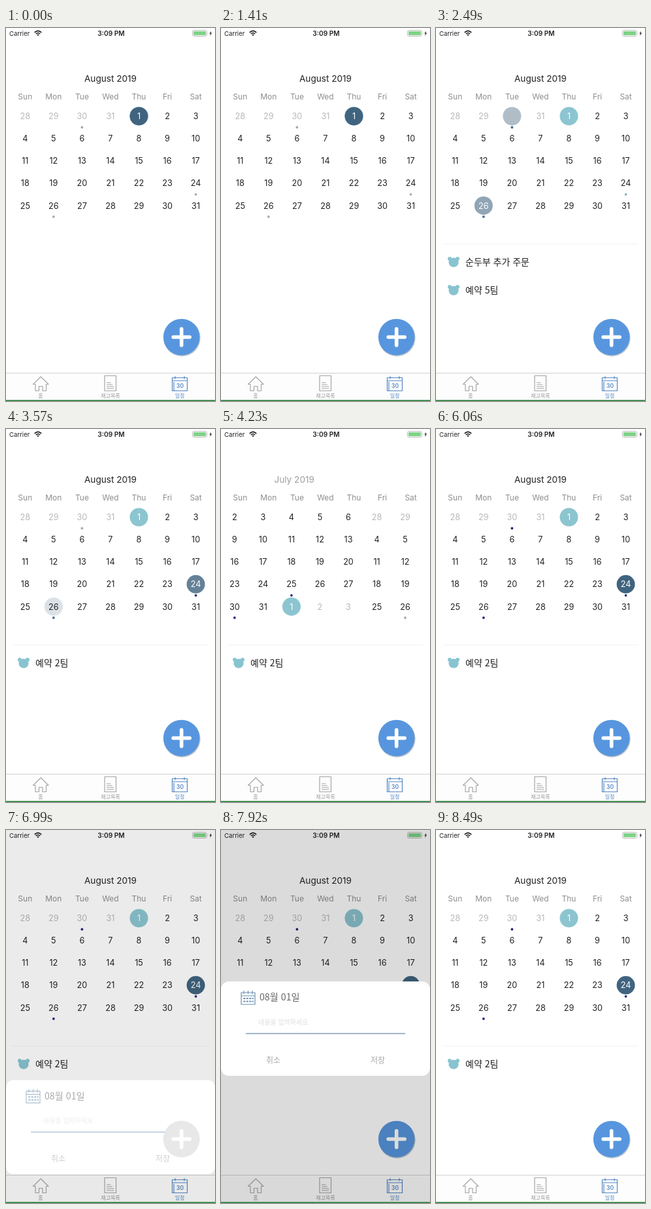
An HTML page that plays this animation: 320x569 px, repeating every 8550 ms.

```html
<!DOCTYPE html>
<html lang="ko">
<head>
<meta charset="utf-8">
<title>Calendar</title>
<style>
html, body { margin: 0; height: 100%; overflow: hidden; background: #fff; }
svg { display: block; width: 100vw; height: 100vh; }
text { font-family: Inter, "Noto Sans CJK KR", "Noto Sans CJK", sans-serif; }
.ko { font-family: "Noto Sans CJK KR", "Noto Sans CJK", sans-serif; }
.mid { text-anchor: middle; }
.line { fill: none; stroke-width: 1.2; stroke-linejoin: round; stroke-linecap: round; }
</style>
</head>
<body>
<svg viewBox="0 0 320 569">
  <defs>
    <clipPath id="page"><rect x="7" y="60" width="306" height="260"/></clipPath>
    <clipPath id="card"><rect width="320" height="144" rx="12"/></clipPath>
    <g id="bear" fill="#88c4d0">
      <ellipse cx="27" cy="0.6" rx="7.6" ry="7.2"/>
      <circle cx="21" cy="-5" r="3"/><circle cx="33" cy="-5" r="3"/>
    </g>
    <path id="cross" d="M-12.5 0H12.5M0-12.5V12.5" stroke="#fff" stroke-width="5.6" stroke-linecap="round"/>
  </defs>
  <rect width="320" height="569" fill="#fff"/>

  <g fill="#222">
    <text x="5" y="11.8" font-size="9.6">Carrier</text>
    <text x="161" y="12" font-size="10.2" font-weight="600" class="mid">3:09 PM</text>
    <g class="line" stroke="#111" style="stroke-width:1.6;stroke-linecap:butt">
      <path d="M43.8 6.8Q49 2 54.2 6.8M45.8 9Q49 6 52.2 9"/>
    </g>
    <path d="M47.3 10.2Q49 8.8 50.7 10.2L49 12.2Z"/>
    <rect x="285.5" y="3.5" width="22" height="9" rx="2.5" fill="#fff" stroke="#bbb"/>
    <rect x="287" y="5" width="19" height="6" rx="1.2" fill="#7fd288"/>
    <path d="M309 6.5q1.4 1.5 0 3Z" fill="#bbb"/>
    <path d="M314 4.5L311.4 8.6H313L312.2 12L315.2 7.6H313.4Z"/>
  </g>

  <g id="titles" font-size="13.6" fill="#222" class="mid">
    <text y="82">August 2019</text><text y="82">July 2019</text>
  </g>
  <g id="week" font-size="12" fill="#8e8e8e" class="mid"></g>
  <g clip-path="url(#page)" font-size="12.7" class="mid"><g id="august"></g><g id="july"></g></g>

  <path id="rule" d="M10 329.5H310" stroke="#f3f3f3"/>
  <g id="two" class="ko" font-size="14" fill="#222">
    <use href="#bear" y="357"/><text class="ko" x="45" y="362">순두부 추가 주문</text>
    <use href="#bear" y="400"/><text class="ko" x="45" y="405">예약 5팀</text>
  </g>
  <g id="one" font-size="14" fill="#222">
    <use href="#bear" y="357"/><text class="ko" x="45" y="362">예약 2팀</text>
  </g>

  <g transform="translate(268.7 471.5)">
    <circle cx=".8" cy="1.2" r="28.2" fill="#8a96a4" opacity=".55"/>
    <circle r="27.8" fill="#5796de"/><use href="#cross"/>
  </g>

  <rect y="526" width="320" height="43" fill="#fdfdfd"/>
  <path d="M0 526.5H320" stroke="#d2d2d2"/>
  <g class="line" stroke="#a6a6a6">
    <path d="M41.5 543.5L53.3 532L65 543.5H61.5V553.5H56V546.5H50.5V553.5H45V543.5Z"/>
    <path d="M151 530.5H168.5V553.5H151ZM154.5 541H160M154.5 544H162.5M154.5 547H165M154.5 550H165"/>
  </g>
  <g class="line" stroke="#5588c4">
    <path d="M254.5 533.5H277.5V553.5H254.5ZM254.5 538H277.5M259 531.5V535M273 531.5V535M257 553.5V540"/>
  </g>
  <text x="266.5" y="549" font-size="8.5" font-weight="600" fill="#5588c4" class="mid">30</text>
  <g font-size="8" fill="#999" class="mid">
    <text class="ko" x="53" y="564.3">홈</text><text class="ko" x="160" y="564.3">재고목록</text>
    <text class="ko" x="266" y="564.3" fill="#5588c4">일정</text>
  </g>

  <rect id="dim" width="320" height="569"/>
  <g id="sheet"><g clip-path="url(#card)">
    <rect width="320" height="144" fill="#fff"/>
    <g id="form">
      <g class="line" stroke="#6d8fb0">
        <path d="M31 17H52V35H31ZM31 22H52M35 14.5V19M41.5 14.5V19M48 14.5V19"/>
        <path d="M35 26H49M35 30.5H49" stroke-dasharray="1.5 3" stroke-width="2"/>
      </g>
      <text class="ko" x="59" y="29.3" font-size="14.2" fill="#666">08월 01일</text>
      <text class="ko" x="57" y="66" font-size="10" fill="#ddd">내용을 입력하세요</text>
      <path d="M38 79.5H282" stroke="#7f9dbb" stroke-width="1.4"/>
      <g font-size="12" fill="#a8a8a8" class="mid">
        <text class="ko" x="80" y="124.5">취소</text><text class="ko" x="240" y="124.5">저장</text>
      </g>
    </g>
    <g id="ghost"><circle r="28" fill="#e8e8e8"/><use href="#cross"/></g>
  </g></g>
  <path d="M0 568.3H320" stroke="#1c7c2c" stroke-width="1.4"/>
</svg>
<script>
const LOOP = 8550, COL = 43.55, PAGE = COL * 7, X0 = 29.3, Y0 = 134.5, ROW = 34.1;
const NAVY = '#24247c', GREY = '#aaa', DARK = '#222', MUTED = '#b8b8b8';
const $ = id => document.getElementById(id);
const ramp = (t, a, b) => Math.min(1, Math.max(0, (t - a) / (b - a)));
const smooth = u => u * u * (3 - 2 * u);
const glide = u => 1 - (1 - u) ** 2.1;

function add(parent, tag, attrs, text) {
  const el = document.createElementNS('http://www.w3.org/2000/svg', tag);
  for (const k in attrs) el.setAttribute(k, attrs[k]);
  if (text) el.textContent = text;
  parent.append(el);
  return el;
}

'Sun Mon Tue Wed Thu Fri Sat'.split(' ').forEach((d, i) =>
  add($('week'), 'text', { x: X0 + COL * i, y: 109.3 }, d));

// Cells run from `first` of the previous month (with `lead` days) over five weeks.
function month(group, first, lead, today, dotted) {
  return Array.from({ length: 35 }, (_, i) => {
    const x = X0 + COL * (i % 7), y = Y0 + ROW * Math.floor(i / 7);
    const n = i - lead, inside = n >= 0 && n < 31;
    const day = n < 0 ? first + i : n % 31 + 1;
    const cell = { ink: i === today ? '#fff' : inside ? DARK : MUTED };
    if (i === today) add(group, 'circle', { cx: x, cy: y, r: 14, fill: '#8cc5d0' });
    cell.disc = add(group, 'circle', { cx: x, cy: y, r: 14, fill: '#40647f', opacity: 0 });
    cell.text = add(group, 'text', { x, y: y + 4.6, fill: cell.ink }, String(day));
    if (dotted.includes(i)) cell.dot = add(group, 'circle', { cx: x, cy: y + 17, r: 1.9, fill: NAVY });
    return cell;
  });
}
const TODAY = 4, A = 2, B = 29, C = 27;
const aug = month($('august'), 28, 4, TODAY, [A, B, C]);
month($('july'), 30, 1, 32, [21, 22, 25, 30]);

// cell index, time picked, time left
const picks = [[TODAY, -999, 1620], [A, 1620, 2340], [B, 2340, 3360], [C, 3360, 1e5]];

function draw(t) {
  for (const [i, from, to] of picks) {
    const cell = aug[i], on = t >= from && t < to;
    cell.disc.setAttribute('opacity', ramp(t, from, from + 260) - ramp(t, to, to + 260));
    cell.text.setAttribute('fill', on ? '#fff' : cell.ink);
    if (cell.dot) {
      const rest = i === C && t > 1620 ? '#7fb9c2' : GREY;
      const lit = on || t < to + 260 && t >= to;
      cell.dot.setAttribute('fill', t > 5130 || i === C && on ? NAVY : lit ? '#4a6a94' : rest);
    }
  }

  const s = glide(ramp(t, 3900, 4680)) - glide(ramp(t, 5460, 6060));
  $('august').setAttribute('transform', `translate(${PAGE * s})`);
  $('july').setAttribute('transform', `translate(${PAGE * (s - 1)})`);
  [...$('titles').children].forEach((el, i) => {
    const d = s - i;
    el.setAttribute('x', 160 + d * PAGE / 2);
    el.setAttribute('opacity', Math.max(0, 1 - 1.8 * Math.abs(d)));
  });

  $('two').setAttribute('opacity', t >= 1620 && t < 3420 ? 1 : 0);
  $('one').setAttribute('opacity', t >= 3420 ? 1 : 0);
  $('rule').setAttribute('opacity', t >= 1620 ? 1 : 0);

  const p = smooth(ramp(t, 6540, 7380)) - smooth(ramp(t, 8070, 8460));
  const top = 569 - 338 * p;
  $('dim').setAttribute('opacity', 0.143 * p);
  $('sheet').setAttribute('transform', `translate(0 ${top})`);
  $('sheet').setAttribute('visibility', p > 0 ? 'visible' : 'hidden');
  $('form').setAttribute('opacity', p);
  $('ghost').setAttribute('transform', `translate(268.7 ${471.5 - top})`);
}

const start = performance.now();
function tick() {
  draw((performance.now() - start) % LOOP);
  requestAnimationFrame(tick);
}
tick();
</script>
</body>
</html>
```
